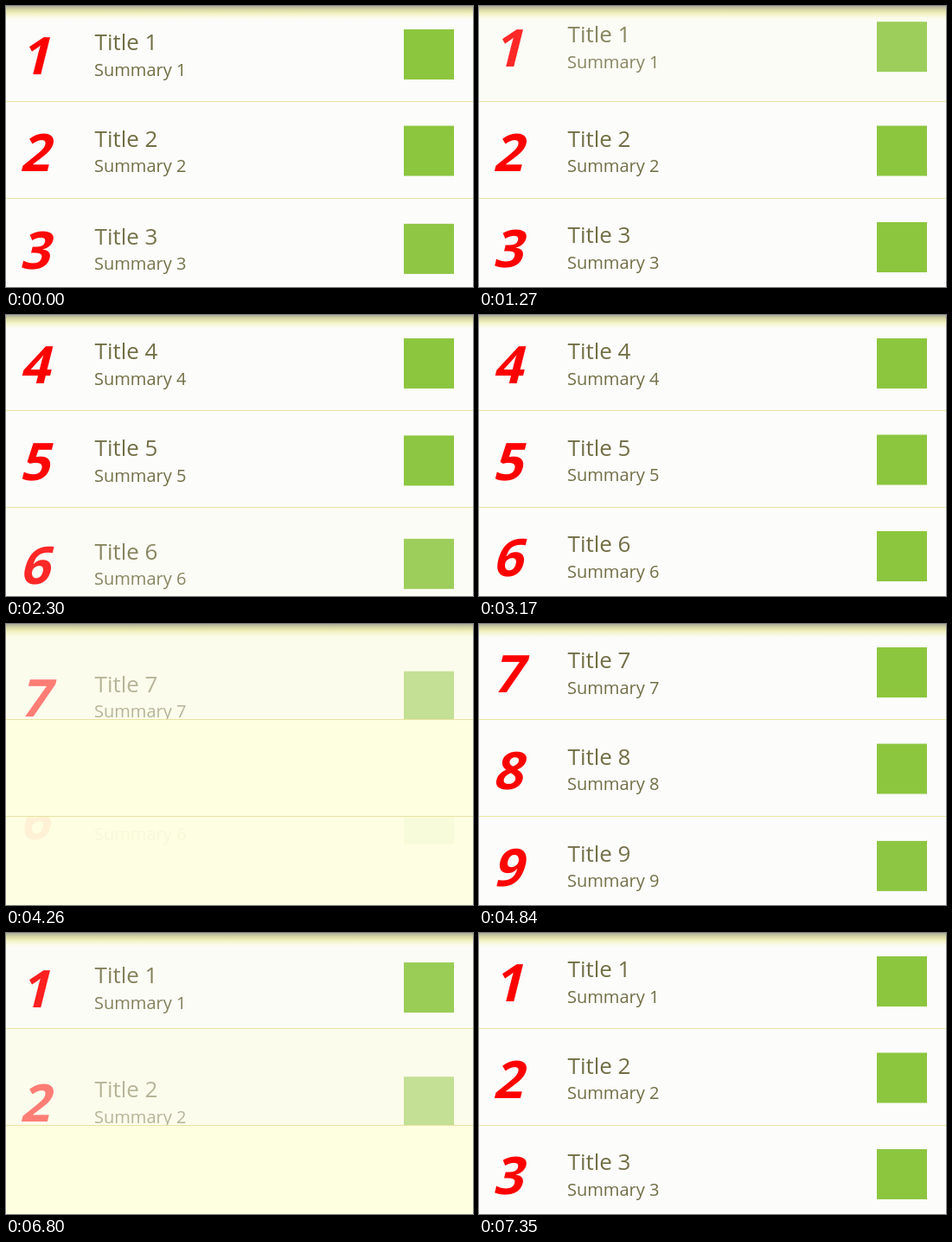
An HTML page with a canvas for the animation above (7.39 s loop, 540 px wide and 325 px high).

```html
<!DOCTYPE html>
<html lang="en">
<head>
<meta charset="utf-8">
<title>List swap</title>
<style>
  html, body { margin: 0; width: 100%; height: 100%; overflow: hidden; background: #fcfcfb; }
  canvas { display: block; }
</style>
</head>
<body>
<canvas id="stage" width="540" height="325"></canvas>
<script>
const ctx = document.getElementById('stage').getContext('2d');
const W = 540, LOOP = 7390;
const ROW = 111.5;      // row pitch
const SHIFT = 56;       // slide distance
const SLIDE = 520;      // one slide, out or in
const STAGGER = 150;    // delay per row
const SLANT = 0.25;     // lean of the big digits
const SWAPS = [-1172, 1242, 3632, 6022];
const FIRST = [7, 1, 4, 7, 1]; // first number before and after each swap
const FONT = '"Open Sans", "Noto Sans", sans-serif';

const clamp = v => Math.min(1, Math.max(0, v));
const left = u => Math.pow(1 - clamp(u), 3); // decelerating remainder

function text(str, x, y, font, color) {
  ctx.font = font + ' ' + FONT;
  ctx.fillStyle = color;
  ctx.fillText(str, x, y);
}

function drawItem(n, y) {
  ctx.save();
  ctx.transform(1, 0, -SLANT, 1, 15.5, y + 79);
  text(n, 0, 0, '700 60px', '#ff0000');
  ctx.restore();
  text('Title ' + n, 102.5, y + 51, '500 26px', '#726f45');
  text('Summary ' + n, 102, y + 80.5, '500 20px', '#726f45');
  ctx.fillStyle = '#8cc63f';
  ctx.fillRect(460, y + 27, 58, 58);
}

function drawRow(i, t, before, after) {
  const local = t - i * STAGGER;
  const leaving = local < SLIDE;
  const rest = left(leaving ? local / SLIDE : local / SLIDE - 1);
  const alpha = leaving ? rest : 1 - rest;
  const shift = leaving ? -SHIFT * (1 - rest) : SHIFT * rest;
  const top = Math.floor(i * ROW);
  const height = Math.floor((i + 1) * ROW) - top;

  ctx.save();
  ctx.beginPath();
  ctx.rect(0, top, W, height);
  ctx.clip();
  // the row behind a faded item is pale yellow
  ctx.fillStyle = '#fefee0';
  ctx.fillRect(0, top, W, height);
  ctx.globalAlpha = alpha;
  ctx.fillStyle = '#fcfcfb';
  ctx.fillRect(0, top, W, height);
  drawItem(String((leaving ? before : after) + i), i * ROW + shift);
  ctx.restore();
}

function drawShadow() {
  const g = ctx.createLinearGradient(0, 0, 0, 17);
  g.addColorStop(0, 'rgba(172,172,154,1)');
  g.addColorStop(0.2, 'rgba(206,206,158,.95)');
  g.addColorStop(0.5, 'rgba(236,236,170,.75)');
  g.addColorStop(1, 'rgba(252,252,220,0)');
  ctx.fillStyle = g;
  ctx.fillRect(0, 0, W, 17);
}

function draw(time) {
  let k = 0;
  while (k + 1 < SWAPS.length && time >= SWAPS[k + 1]) k++;
  for (let i = 0; i < 3; i++) drawRow(i, time - SWAPS[k], FIRST[k], FIRST[k + 1]);

  ctx.fillStyle = '#e8e4a0';
  ctx.fillRect(0, 110, W, 1);
  ctx.fillRect(0, 222, W, 1);
  drawShadow();
}

const start = performance.now();
function tick() {
  draw((performance.now() - start) % LOOP);
  requestAnimationFrame(tick);
}
tick();
</script>
</body>
</html>
```
